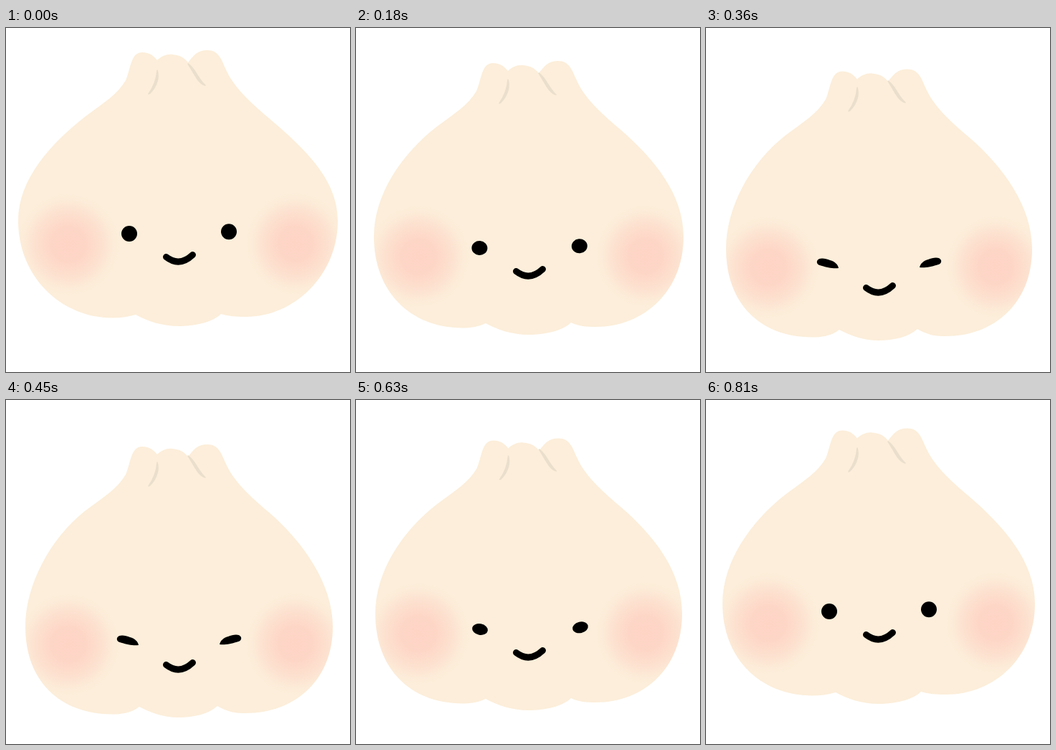
Write an HTML page that moves like this. It is 480 px wide and 480 px high and loops after 0.9 s.

```html
<!DOCTYPE html>
<html lang="en">
<head>
<meta charset="utf-8">
<title>Squishy bun</title>
<style>
html, body { margin: 0; width: 100%; height: 100%; overflow: hidden; background: #fff; }
svg { display: block; width: 100%; height: 100%; }
</style>
</head>
<body>
<svg viewBox="0 0 480 480">
  <defs>
    <radialGradient id="blush">
      <stop offset="0" stop-color="#fed4c5"/>
      <stop offset=".35" stop-color="#fed4c5" stop-opacity=".92"/>
      <stop offset=".65" stop-color="#fed4c5" stop-opacity=".5"/>
      <stop offset=".88" stop-color="#fed4c5" stop-opacity=".1"/>
      <stop offset="1" stop-color="#fed4c5" stop-opacity="0"/>
    </radialGradient>
    <clipPath id="inside"><path id="clip"/></clipPath>
  </defs>
  <path id="body" fill="#fceeda"/>
  <g clip-path="url(#inside)" fill="url(#blush)">
    <ellipse id="cheekL" cx="87" rx="71" ry="71"/>
    <ellipse id="cheekR" cx="404" rx="69" ry="71"/>
  </g>
  <g id="folds" fill="#eadfcc" stroke="#eadfcc" stroke-width="1.5" stroke-linejoin="round">
    <path d="M211 59C214 68 211 81 201 91L199 92C206 82 210 72 211 59Z"/>
    <path d="M254 50C263 55 268 71 278 80C268 78 262 62 254 50Z"/>
  </g>
  <g id="open">
    <ellipse id="eyeL"/>
    <ellipse id="eyeR"/>
  </g>
  <g id="shut">
    <path id="lid" d="M155 325C157 320 166 321 173 324C180 326 184 330 185 335C178 336 168 334 162 332C157 331 154 329 155 325Z"/>
    <use href="#lid" transform="matrix(-1 0 0 1 483 -1)"/>
  </g>
  <path id="mouth" d="M223.500 319.500Q242 334 260.500 316.500" fill="none" stroke="#000" stroke-width="9" stroke-linecap="round"/>
</svg>
<script>
const STEP = 90;
const $ = id => document.getElementById(id);
const set = (id, attrs) => {
  for (const k in attrs) $(id).setAttribute(k, attrs[k]);
};

// From stretched to fully squashed; lid is null while the eyes are open
const poses = [
  { top: 0, dx: 0, left: 17, right: 463, side: 269, lobe: 404, notch: 400, mid: 416, inset: 0,
    fold: 0, cheek: 302, face: 0, eye: 287, ry: 11, tilt: 0, lid: null },
  { top: 8.5, dx: 0, left: 23, right: 459, side: 284, lobe: 412, notch: 408, mid: 424, inset: 0,
    fold: 8, cheek: 312, face: 8, eye: 295, ry: 11, tilt: 0, lid: null },
  { top: 15, dx: 1, left: 25, right: 457, side: 291, lobe: 418, notch: 412, mid: 428, inset: 0,
    fold: 13, cheek: 319, face: 20, eye: 307, ry: 10, tilt: 4, lid: null },
  { top: 22.5, dx: 1.5, left: 27, right: 455, side: 298, lobe: 423, notch: 417, mid: 433, inset: 0,
    fold: 19, cheek: 326, face: 33, eye: 320, ry: 7.8, tilt: 10, lid: null },
  { top: 26.5, dx: 0, left: 28, right: 455, side: 308, lobe: 431, notch: 421, mid: 436, inset: 5,
    fold: 24, cheek: 334, face: 43, eye: 328, ry: 6, tilt: 12, lid: 0 },
  { top: 31, dx: 0, left: 27, right: 456, side: 316, lobe: 438, notch: 428, mid: 443, inset: 5,
    fold: 28, cheek: 341, face: 50, eye: 335, ry: 6, tilt: 12, lid: 7 }
];

function outline(p) {
  const at = (x, y) => `${x + p.dx} ${y + p.top} `;
  const nl = 181 + p.inset, nr = 300 - p.inset, { left, right, side, lobe, notch, mid } = p;
  return "M" + at(167, 73) +
    "C" + at(174, 57) + at(174, 34) + at(190, 34) +
    "C" + at(201, 34) + at(206, 39) + at(211, 45) +
    "C" + at(217, 39) + at(225, 36) + at(232, 37) +
    "C" + at(243, 38) + at(248, 41) + at(254, 48) +
    "C" + at(262, 38) + at(267, 31) + at(281, 31) +
    "C" + at(297, 31) + at(301, 45) + at(306, 56) +
    "C" + at(317, 82) + at(340, 103) + at(366, 125) +
    `C${at(415, 167)}${right} ${side - 59} ${right} ${side} ` +
    `C${right} ${side + 76} 402 ${lobe - 1} 335 ${lobe - 1} ` +
    `C321 ${lobe - 1} 310 ${lobe - 2} ${nr} ${notch - 1} ` +
    `C${nr - 12} ${mid - 5} 262 ${mid} 241 ${mid} ` +
    `C218 ${mid} ${nl + 16} ${mid - 7} ${nl} ${notch} ` +
    `C${nl - 11} ${lobe - 1} 160 ${lobe + .5} 148 ${lobe + .5} ` +
    `C75 ${lobe} ${left} ${side + 76} ${left} ${side} ` +
    `C${left} ${side - 58} ${at(62, 162)}${at(110, 124)}` +
    "C" + at(137, 104) + at(156, 92) + at(167, 73) + "Z";
}

function eye(id, x, y, p, turn) {
  set(id, { cx: x, cy: y, rx: 11, ry: p.ry, transform: `rotate(${turn} ${x} ${y})` });
}

function draw(p) {
  const d = outline(p);
  set("body", { d });
  set("clip", { d });
  set("cheekL", { cy: p.cheek });
  set("cheekR", { cy: p.cheek - 1 });
  set("folds", { transform: `translate(${p.dx} ${p.fold})` });
  set("mouth", { transform: `translate(0 ${p.face})` });
  const shut = p.lid !== null;
  set("open", { visibility: shut ? "hidden" : "visible" });
  set("shut", { visibility: shut ? "visible" : "hidden", transform: `translate(0 ${p.lid || 0})` });
  eye("eyeL", 172 + p.tilt / 10, p.eye, p, p.tilt);
  eye("eyeR", 311 + p.tilt / 5, p.eye - 2.7, p, -p.tilt * 1.3);
}

let last = -1;
function tick(now) {
  const n = Math.floor(now / STEP) % 10;
  const i = 5 - Math.abs(5 - n); // down to the squash and back
  if (i !== last) draw(poses[last = i]);
  requestAnimationFrame(tick);
}
draw(poses[0]);
requestAnimationFrame(tick);
</script>
</body>
</html>
```
